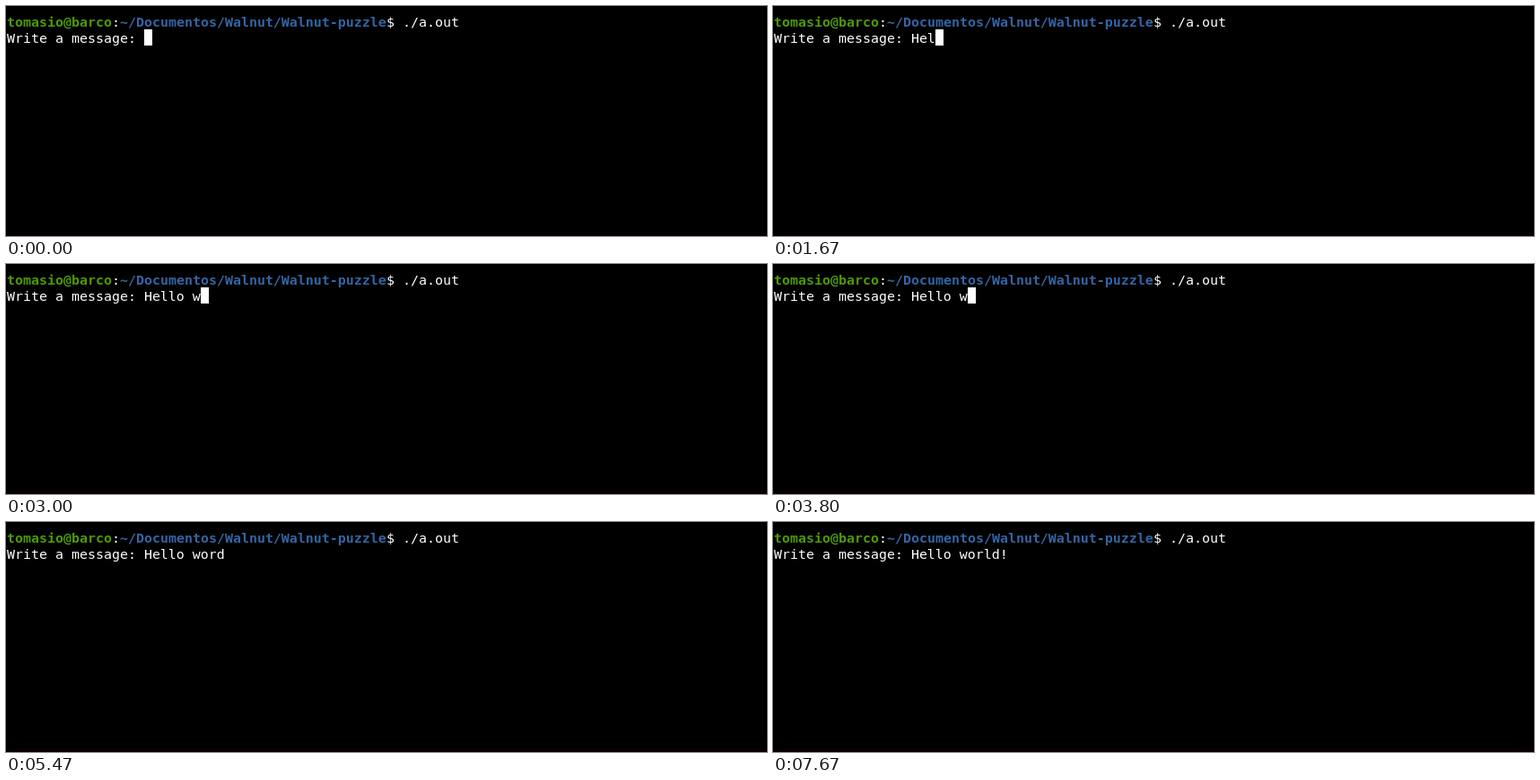
Write an HTML page with a canvas that moves like this. It is 848 px wide and 256 px high and loops after 8 s.

```html
<!DOCTYPE html>
<html lang="en">
<head>
<meta charset="utf-8">
<title>Terminal typing</title>
<style>
  html, body { margin: 0; width: 100%; height: 100%; overflow: hidden; background: #000; }
  canvas { display: block; }
</style>
</head>
<body>
<canvas id="screen" width="848" height="256"></canvas>
<script>
const ctx = document.getElementById('screen').getContext('2d', { alpha: false });
const LOOP = 8000, CELL = 9, ROW = 18, LEFT = 1, TOP = 8, BASELINE = 15;
const WHITE = '#ffffff', GREEN = '#4e9a06', BLUE = '#3465a4';
const LABEL = 'Write a message: ';

// Key presses: '<' is backspace, '' hides the cursor until the next key.
const keys = [
  [530, 'H'], [1330, 'e'], [1670, 'l'], [1870, 'l'], [2130, 'o'], [2530, ' '],
  [3000, 'w'], [3330, 'o'], [3800, '<'], [4200, 'o'], [4530, 'r'], [4930, 'd'],
  [5470, ''], [5530, '<'], [5870, 'l'], [6200, 'd'], [7070, '!'], [7670, '']
];

function stateAt(time) {
  let message = '', cursor = true;
  for (const [at, key] of keys) {
    if (at > time) break;
    message = key === '<' ? message.slice(0, -1) : message + key;
    cursor = key !== '';
  }
  return { message, cursor };
}

// Writes text on the character grid and returns the next free column.
function write(text, column, row, color, weight = 'normal') {
  ctx.font = `${weight} 14.95px "DejaVu Sans Mono", monospace`;
  ctx.fillStyle = color;
  ctx.fillText(text, LEFT + column * CELL, TOP + row * ROW + BASELINE);
  return column + text.length;
}

function draw(time) {
  ctx.fillStyle = '#000';
  ctx.fillRect(0, 0, 848, 256);
  ctx.fillStyle = '#080004';
  ctx.fillRect(0, 252, 848, 4);

  let column = write('tomasio@barco', 0, 0, GREEN, 'bold');
  column = write(':', column, 0, WHITE);
  column = write('~/Documentos/Walnut/Walnut-puzzle', column, 0, BLUE, 'bold');
  write('$ ./a.out', column, 0, WHITE);

  const { message, cursor } = stateAt(time);
  column = write(LABEL + message, 0, 1, WHITE);
  if (cursor) ctx.fillRect(LEFT + column * CELL, TOP + ROW, CELL, ROW);
}

const start = performance.now();
function tick() {
  draw((performance.now() - start) % LOOP);
  requestAnimationFrame(tick);
}
tick();
</script>
</body>
</html>
```
